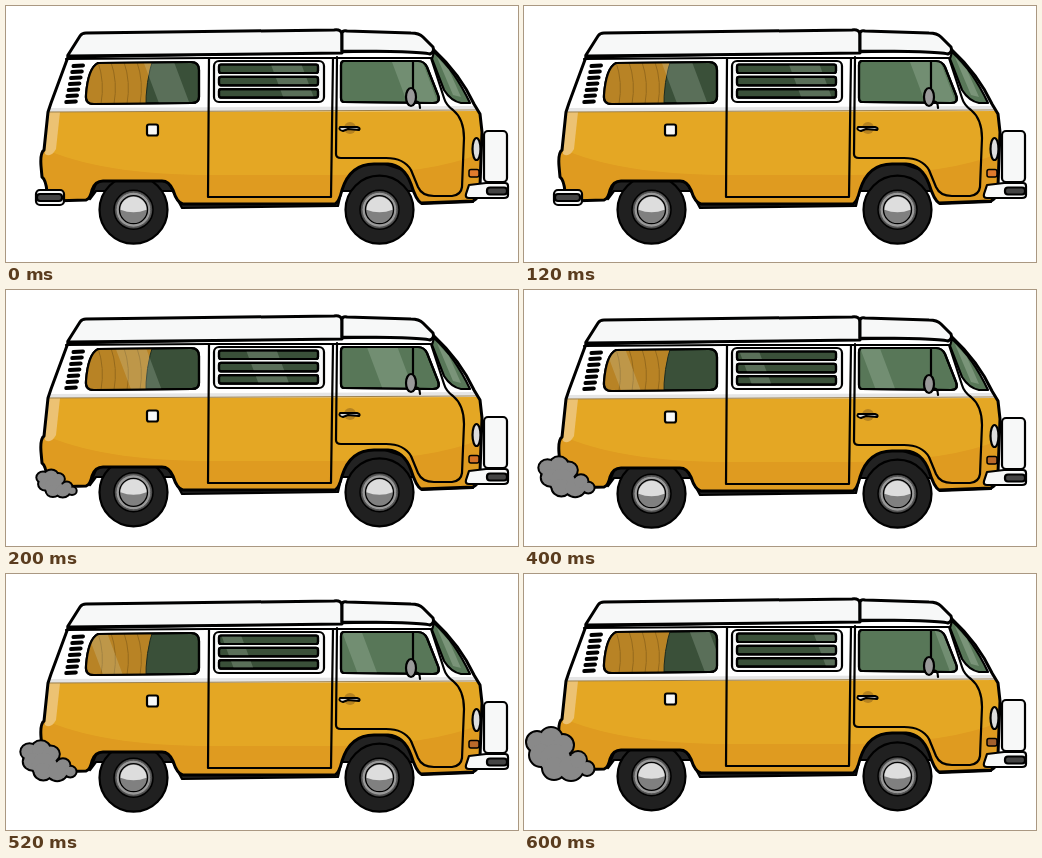
Write an HTML page that moves like this. It is 512 px wide and 256 px high and loops after 0.8 s.

```html
<!DOCTYPE html>
<html lang="en">
<meta charset="utf-8">
<title>Camper van</title>
<style>
html, body { margin: 0; width: 100%; height: 100%; overflow: hidden; background: #fff }
svg { display: block; width: 100vw; height: 100vh }
.l { fill: none }
.b { stroke-width: 3 }
.w { fill: #f7f8f8 }
.g { fill: #587758 }
.d { fill: #3a5039 }
</style>
<svg viewBox="0 0 512 256" stroke="#000" stroke-width="2.2" stroke-linejoin="round" stroke-linecap="round">
  <defs>
    <path id="shell" d="M62 51L45 97L42 106L38 144Q34 147 35 160L36 171Q40 174 41 186L46 195L80 194Q84 193 86 184Q89 175 97 175H156Q163 175 167 184Q171 197 177 198H329Q333 196 336 184Q344 158 368 158H382Q398 159 405 178Q410 194 415 197L467 195Q474 192 474 180L476 126L474 108L468 98Q454 68 428 44Z"/>
    <path id="rear" d="M92 57L185 56Q193 56 193 64V91Q193 97 186 97L88 98Q79 98 80 89Q82 62 92 57Z"/>
    <path id="side" d="M338 55H412Q418 55 421 61L432 89Q435 97 427 97L338 96Q335 96 335 92V59Q335 55 338 55Z"/>
    <g id="slats"></g>
    <clipPath id="inShell"><use href="#shell"/></clipPath>
    <clipPath id="inRear"><use href="#rear"/></clipPath>
    <g id="wheel">
      <circle r="34" fill="#202020"/>
      <circle r="19.5" fill="#4b4b4b" stroke-width="1.5"/>
      <circle r="17.5" fill="#999" stroke="#555" stroke-width="1"/>
      <circle r="14" fill="#808080" stroke-width="1.3"/>
      <path d="M-13 0A13 13 0 0 1 13 0Q0 5-13 0Z" fill="#ddd" stroke="none"/>
    </g>
  </defs>

  <path id="under" fill="#222" d="M84 193L92 172H160L176 202L332 200L340 165L370 155L400 165L416 198L467 196V185H90Z"/>
  <g id="wheels"><use href="#wheel" x="127.5"/><use href="#wheel" x="373.5"/></g>

  <g id="van">
    <rect class="w" x="478" y="125" width="23" height="51" rx="4"/>
    <g clip-path="url(#inShell)" stroke="none">
      <path fill="#e4a724" d="M0 0H512V256H0Z"/>
      <path fill="#df9b20" d="M30 139Q90 169 205 169H330Q430 168 480 145V210H30Z"/>
      <path fill="#ecc273" d="M42 106H54L50 143Q45 152 39 148Z"/>
      <path fill="#fff" d="M30 30H480V105L41 106Z"/>
      <path fill="#e5e5e5" d="M40 102L470 100L476 104L41 106Z"/>
      <path class="l" stroke="#9b7f4b" stroke-width="1" d="M41 106L474 104"/>
    </g>
    <use href="#shell" class="l b"/>

    <path class="w b" d="M62 49L74 30Q76 27 80 27L328 24Q336 23 336 29V47L64 50Q61 51 62 49Z"/>
    <path class="w b" d="M336 27Q337 24 341 25L405 27Q413 27 417 31L427 41Q429 46 424 48Q412 45 336 45Z"/>
    <path class="l" d="M60 53L202 52H424"/>

    <use href="#rear" class="d"/>
    <g clip-path="url(#inRear)" stroke="#94691c" stroke-width="1">
      <path fill="#b88325" stroke="#1c2c20" d="M70 50H148Q139 76 140 104H70Z"/>
      <g id="folds" class="l"></g>
    </g>
    <rect class="w" x="208" y="55" width="110" height="41" rx="5"/>
    <use href="#slats" class="d"/>
    <use href="#side" class="g"/>
    <path class="g" d="M428 46Q449 65 464 97L455 97Q445 95 438 84L426 53Z"/>
    <path stroke="none" fill="#91a990" opacity=".6" d="M431 51L443 64L455 91L447 89Z"/>
    <g id="glares" stroke="none" fill="#d9eadb" opacity=".2"></g>
    <use href="#rear" class="l"/>
    <use href="#slats" class="l"/>
    <use href="#side" class="l"/>
    <g id="vents" stroke-width="4"></g>

    <path class="l" d="M203 53L202 191H325L327 52M331 51L330 148Q330 152 335 152H380Q398 152 405 164L412 181Q416 190 428 190H446Q455 189 456 181L458 132Q458 113 447 104Q440 99 438 92L425 52M407 56V82"/>
    <rect class="w" x="141" y="118.500" width="11" height="11" rx="2"/>
    <circle cx="344" cy="122" r="6" fill="#b58220" stroke="none"/>
    <path fill="#ddd" stroke-width="2" d="M334 121H351Q355 122 353 124L342 123L337 125Q332 124 334 121Z"/>
    <path class="l" d="M408 96Q414 94 414 102"/>
    <ellipse cx="405" cy="91" rx="5" ry="9" fill="#999"/>
    <ellipse cx="470.500" cy="143" rx="4" ry="11" fill="#ddd"/>
    <rect id="lamp" x="463" y="163.500" width="10" height="7.500" rx="2" stroke-width="1.500"/>
    <path class="w" d="M463 179L480 177H499Q502 177 502 180V189Q502 192 498 192H463Q459 192 460 188Z"/>
    <rect x="481" y="181.500" width="20" height="7" rx="3" fill="#444"/>
    <g id="bumper">
      <rect class="w" x="30" y="184" width="28" height="15" rx="4"/>
      <rect x="31" y="188" width="25" height="7" rx="3" fill="#444"/>
    </g>
  </g>
  <g id="smoke"></g>
</svg>
<script>
const $ = id => document.getElementById(id);
const repeat = (n, draw) => Array.from({ length: n }, (_, i) => draw(i)).join('');
const move = (id, y) => $(id).setAttribute('transform', `translate(0 ${y})`);

$('slats').innerHTML = repeat(3, i => `<rect x="213" y="${58.5 + 12.3 * i}" width="99" height="8.5" rx="2"/>`);
$('vents').innerHTML = repeat(7, i => `<path d="M${67.5 - 1.2 * i} ${60 + 6 * i}l9.5-.6"/>`);
$('folds').innerHTML = repeat(4, i => `<path d="M${92 + 13 * i} 56q7 20 3 42"/>`);

// One streak of light per pane, clipped to the glass
const panes = [['rear', 80, 112], ['slats', 213, 99], ['side', 335, 99]];
$('glares').innerHTML = panes.map(([id, left, width]) =>
  `<clipPath id="${id}Glass">${$(id).tagName === 'g' ? $(id).innerHTML : `<use href="#${id}"/>`}</clipPath>
  <g clip-path="url(#${id}Glass)"><path/></g>`).join('');
const streaks = document.querySelectorAll('#glares g path');

function shine(step) {
  const phase = (step + 1) % 4;
  const w = 12 + 20 * Math.sin(Math.PI * (phase + 0.5) / 4);
  panes.forEach(([, left, width], i) => {
    const x = left + width * (0.75 - 0.25 * phase);
    streaks[i].setAttribute('d', `M${x} 52h${w}l18 48h${-w}Z`);
  });
}

// Lobes of the full-grown cloud, measured from its lower right corner: x, y, radius
const lobes = [
  [-57, -39, 10], [-43, -42, 11], [-31, -36, 10], [-53, -26, 11], [-39, -22, 15],
  [-40, -13, 11], [-23, -13, 12], [-16, -21, 8], [-7, -12.5, 6.5]
];

function cloud(step) {
  if (!step) return '';
  const sx = Math.sqrt(step / 3), sy = (step + 1) / 4;
  const draw = line => lobes.map(([x, y, r]) =>
    `<ellipse cx="${70 + x * sx}" cy="${207 + y * sy}" rx="${r * sx}" ry="${r * sy}" fill="#898989" stroke-width="${line}"/>`).join('');
  return draw(4) + draw(0);
}

function show(step) {
  const turn = step * Math.PI / 2;
  const bob = 1.5 - 1.5 * Math.cos(turn) + 0.5 * Math.sin(turn);
  move('van', bob);
  move('under', bob);
  move('wheels', 203 + 0.7 * Math.cos(2 * turn));
  $('lamp').style.fill = `hsl(26 ${75 - 6 * step}% ${53 - 4 * step}%)`;
  $('bumper').style.display = step ? 'none' : '';
  $('smoke').innerHTML = cloud(step);
  shine(step);
}

let last = -1;
function tick(now) {
  const step = Math.floor(now / 200) % 4;
  if (step !== last) show(last = step);
  requestAnimationFrame(tick);
}
tick(performance.now());
</script>
</html>
```
